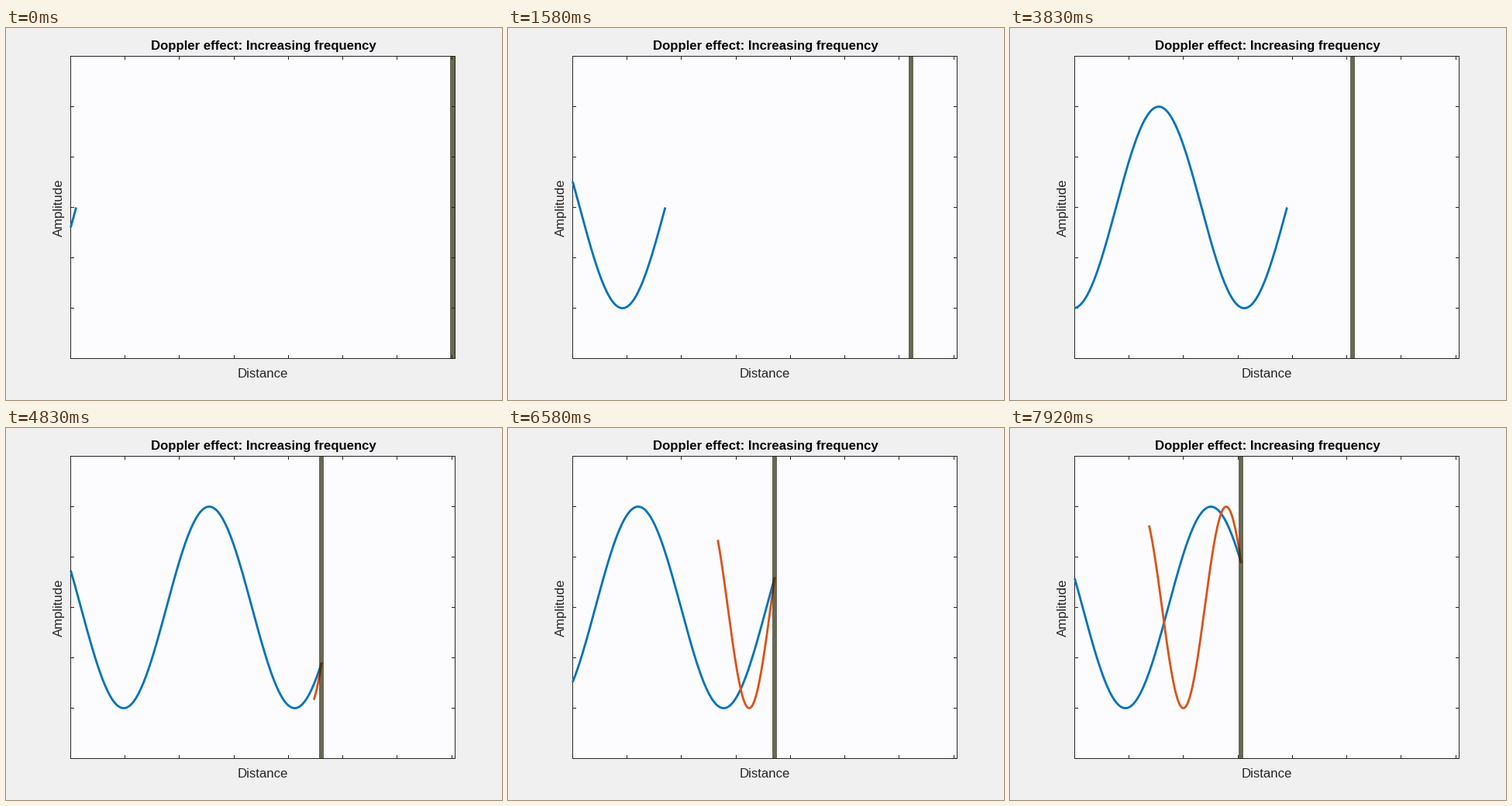
Animation of 640x480 px, one loop 8000 ms. Source, as a matplotlib script:

```python
import numpy as np
import matplotlib.pyplot as plt
from matplotlib.animation import FuncAnimation
from matplotlib.patches import Rectangle

W, H, DPI = 640, 480, 100
TICK_MS, LOOP_MS = 20, 8000
PX = 72 / DPI                      # points per pixel
LEFT, RIGHT, TOP, BOTTOM = 83, 579, 36, 426
UNIT_X, UNIT_Y, MID_Y = 70.25, 65, 231.5
HIT = 48                           # step at which the echo appears

PAPER, PLOT = "#f0f0f0", "#fcfcfe"
FRAME = LABEL = "#262626"
BLUE, ORANGE = "#0072b8", "#d95319"


def to_x(x):
    return LEFT + 0.5 + UNIT_X * np.asarray(x)


def to_y(y):
    return MID_Y - UNIT_Y * np.asarray(y)


fig = plt.figure(figsize=(W / DPI, H / DPI), dpi=DPI, facecolor=PAPER)
ax = fig.add_axes([0, 0, 1, 1])
ax.set_xlim(0, W)
ax.set_ylim(H, 0)
ax.axis("off")


def box(x, y, w, h, color, **kw):
    return ax.add_patch(Rectangle((x, y), w, h, fc=color, lw=0, **kw))


def label(x, y, text, size, **kw):
    ax.text(x, y, text, fontsize=size * PX, family="Liberation Sans",
            ha="center", va="baseline", **kw)


def curve(color):
    return ax.plot([], [], color=color, lw=2.8 * PX, solid_capstyle="butt",
                   solid_joinstyle="round", zorder=3)[0]


# Plot area, border and inward ticks
box(LEFT, TOP, RIGHT - LEFT + 1, BOTTOM - TOP + 1, PLOT, zorder=1)
for y in (TOP, BOTTOM):
    box(LEFT, y, RIGHT - LEFT + 1, 1, FRAME, zorder=2)
for x in (LEFT, RIGHT):
    box(x, TOP, 1, BOTTOM - TOP + 1, FRAME, zorder=2)
for n in range(1, 8):
    x = int(LEFT + 0.4 + UNIT_X * n)
    for y in (TOP, BOTTOM - 4):
        box(x, y, 1, 5, FRAME, zorder=2)
for n in range(-2, 3):
    y = int(to_y(n))
    for x in (LEFT, RIGHT - 4):
        box(x, y, 5, 1, FRAME, zorder=2)

label(332, 28.4, "Doppler effect: Increasing frequency", 16.7,
      weight="bold", color="#080808")
label(331.5, 451, "Distance", 16.7, color=LABEL)
label(73, MID_Y, "Amplitude", 16.6, color=LABEL,
      rotation=90, rotation_mode="anchor")

wave, echo = curve(BLUE), curve(ORANGE)
wall = box(0, TOP, 6, BOTTOM - TOP + 1, "#1e1e00", alpha=2 / 3, zorder=4)


def draw(tick):
    # Twelve pictures a second; every sixth one holds, giving ten steps
    shot = (tick * TICK_MS + TICK_MS - 1) * 12 // 1000
    step = shot - (shot + 3) // 6 + 1
    t = 0.1 * step
    wall_x = 7.06 - 0.05 * step
    wall.set_x(to_x(wall_x) - 3)

    x = np.linspace(0, min(t, wall_x), 200)
    wave.set_data(to_x(x), to_y(2 * np.sin(2 * (x - t))))

    if step >= HIT:
        x = np.linspace(9.365 - t, wall_x, 200)
        phase = 4 * (x - wall_x) + 2 * (wall_x - t)
        echo.set_data(to_x(x), to_y(2 * np.sin(phase)))
    else:
        echo.set_data([], [])
    return wave, echo, wall


anim = FuncAnimation(fig, draw, frames=LOOP_MS // TICK_MS, interval=TICK_MS,
                     repeat=True, repeat_delay=0, blit=False)
plt.show()
```
